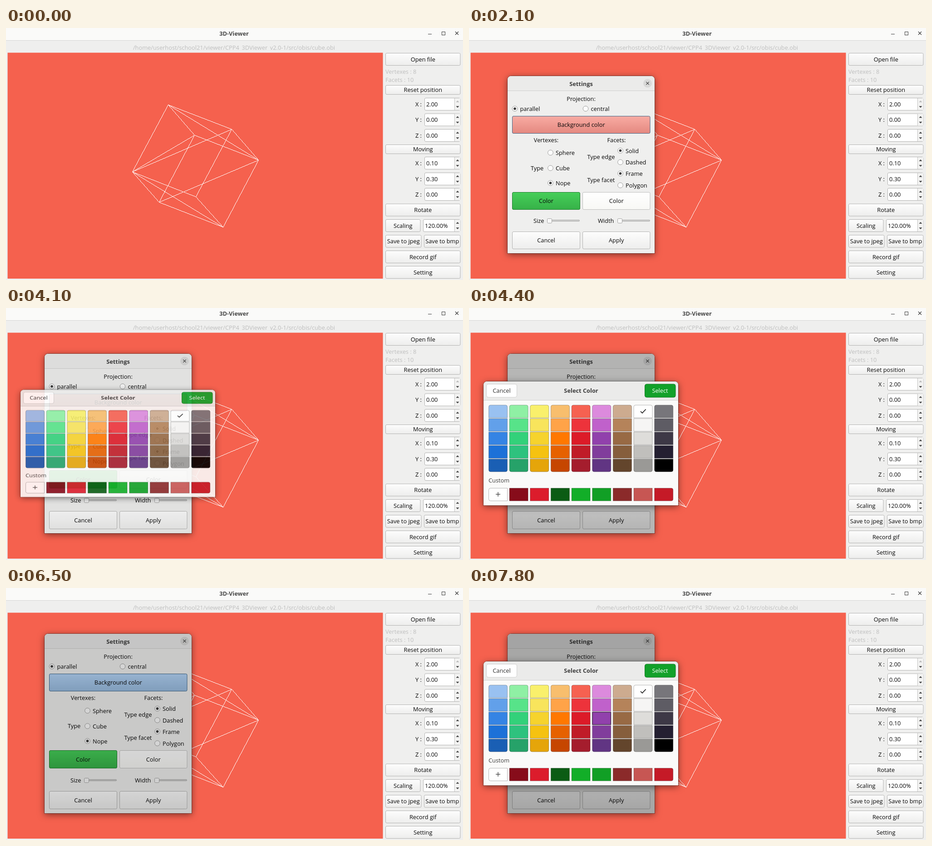
Write an HTML page with a canvas that moves like this. It is 1007 px wide and 556 px high and loops after 8 s.

```html
<!DOCTYPE html>
<html lang="en">
<head>
<meta charset="utf-8">
<title>3D-Viewer</title>
<style>
html, body { margin: 0; width: 100%; height: 100%; overflow: hidden; background: #efefee; }
canvas { display: block; }
</style>
</head>
<body>
<canvas id="stage" width="1007" height="556"></canvas>
<script>
const W = 1007, H = 556, LOOP = 8000, STEP = 100;
const INK = '#080808', WINDOW = '#efefee', HEADER = '#ebebea', RED = '#f5614e';
const stage = document.getElementById('stage').getContext('2d');
let ctx = stage;

// ---- helpers -------------------------------------------------------------
function text(s, x, y, { align = 'left', color = INK, bold = false } = {}) {
  ctx.font = `${bold ? 700 : 500} 12.8px "Open Sans", "Noto Sans", sans-serif`;
  ctx.textAlign = align;
  ctx.fillStyle = color;
  ctx.fillText(s, x, Math.round(y + 4.5));
}
const centred = (s, x, y, options) => text(s, x, y, { align: 'center', ...options });

function box(x, y, w, h, fill, stroke, radius = 2.5) {
  ctx.beginPath();
  ctx.roundRect(x + .5, y + .5, w - 1, h - 1, radius);
  ctx.fillStyle = fill;
  ctx.fill();
  if (!stroke) return;
  ctx.strokeStyle = stroke;
  ctx.lineWidth = 1;
  ctx.stroke();
}

function shade(y, h, top, bottom) {
  const g = ctx.createLinearGradient(0, y, 0, y + h);
  g.addColorStop(0, top);
  g.addColorStop(1, bottom);
  return g;
}

function button(label, x, y, w, h, { top = '#fdfdfd', bottom = '#ededec', border = '#b3b3b2' } = {}) {
  box(x, y, w, h, shade(y, h, top, bottom), border);
  centred(label, x + w / 2, y + h / 2);
}

function stroke(color, width, ...points) {
  ctx.beginPath();
  points.forEach(([x, y], i) => i ? ctx.lineTo(x, y) : ctx.moveTo(x, y));
  ctx.strokeStyle = color;
  ctx.lineWidth = width;
  ctx.stroke();
}

function cross(x, y, r, color = '#3d3d3d') {
  stroke(color, 1.2, [x - r, y - r], [x + r, y + r]);
  stroke(color, 1.2, [x - r, y + r], [x + r, y - r]);
}

function disc(x, y, r, fill, border) {
  ctx.beginPath();
  ctx.arc(x, y, r, 0, 2 * Math.PI);
  ctx.fillStyle = fill;
  ctx.fill();
  if (border) { ctx.strokeStyle = border; ctx.lineWidth = 1; ctx.stroke(); }
}

// One-pixel line without smoothing.
function hardLine([x0, y0], [x1, y1]) {
  const n = Math.max(Math.abs(x1 - x0), Math.abs(y1 - y0));
  for (let i = 0; i <= n; i++)
    ctx.fillRect(Math.round(x0 + (x1 - x0) * i / n), Math.round(y0 + (y1 - y0) * i / n), 1, 1);
}

function makeLayer() {
  const canvas = document.createElement('canvas');
  canvas.width = W;
  canvas.height = H;
  return canvas.getContext('2d');
}

function paintOn(layer, draw) {
  layer.clearRect(0, 0, W, H);
  ctx = layer;
  draw();
  ctx = stage;
}

function windowFrame(x, y, w, h, fill) {
  ctx.save();
  ctx.shadowColor = 'rgba(0,0,0,.5)';
  ctx.shadowBlur = 15;
  ctx.shadowOffsetY = 3;
  ctx.beginPath();
  ctx.roundRect(x, y, w, h, [8, 8, 0, 0]);
  ctx.fillStyle = fill;
  ctx.fill();
  ctx.restore();
  ctx.beginPath();
  ctx.roundRect(x - .5, y - .5, w + 1, h + 1, [8.5, 8.5, 0, 0]);
  ctx.strokeStyle = 'rgba(0,0,0,.35)';
  ctx.lineWidth = 1;
  ctx.stroke();
}

function headerBar(x, y, w, h) {
  ctx.beginPath();
  ctx.roundRect(x, y, w, h, [8, 8, 0, 0]);
  ctx.fillStyle = HEADER;
  ctx.fill();
  ctx.fillStyle = '#cfcfce';
  ctx.fillRect(x, y + h, w, 1);
}

// ---- main window ---------------------------------------------------------
const CUBE = {
  A: [357, 169], B: [497, 223], C: [415, 236], D: [556, 291],
  E: [278, 317], F: [337, 384], G: [418, 372], H: [478, 439]
};
const EDGES = 'AB AC AE BD CD BG CF DH EF EG FH GH AD CE BE DF EH'.split(' ');

function arrow(x, y, dir, color) {
  ctx.beginPath();
  ctx.moveTo(x - 3.5, y + 1.7 * dir);
  ctx.lineTo(x + 3.5, y + 1.7 * dir);
  ctx.lineTo(x, y - 2 * dir);
  ctx.fillStyle = color;
  ctx.fill();
}

function spin(value, x, y, atMax) {
  box(x, y, 1001.5 - x, 28, '#fff', '#b3b3b2');
  ctx.fillStyle = '#f3f3f2';
  ctx.fillRect(989, y + 1, 12, 26);
  ctx.fillStyle = '#c2c2c1';
  ctx.fillRect(988, y + 1, 1, 26);
  arrow(995, y + 8, 1, atMax ? '#b9b9b9' : '#444');
  arrow(995, y + 20, -1, '#444');
  text(value, x + 4, y + 14);
}

function axisSpin(axis, value, y, atMax) {
  text(axis + ' :', 916, y + 14, { align: 'right' });
  spin(value, 922, y, atMax);
}

function mainWindow(focus, pressed) {
  ctx.fillStyle = WINDOW;
  ctx.fillRect(0, 0, W, H);
  ctx.fillStyle = '#fafaf9';
  ctx.fillRect(0, 0, W, 27);
  if (focus) {
    ctx.globalAlpha = focus;
    ctx.fillStyle = HEADER;
    ctx.fillRect(0, 1, W, 26);
    ctx.globalAlpha = 1;
  }
  ctx.fillStyle = '#d6d6d4';
  ctx.fillRect(0, 27, W, 1);
  centred('3D-Viewer', 502.5, 12.5, { bold: true, color: '#474747' });
  ctx.fillStyle = '#3d3d3d';
  ctx.fillRect(930, 13, 8, 1);
  ctx.strokeStyle = '#3d3d3d';
  ctx.lineWidth = 1;
  ctx.strokeRect(960.5, 8.5, 7, 7);
  cross(993.5, 11.5, 3.5);

  ctx.save();
  ctx.beginPath();
  ctx.rect(0, 30, W, 18);
  ctx.clip();
  centred('/home/userhost/school21/viewer/CPP4_3DViewer_v2.0-1/src/objs/cube.obj',
    502.5, 43.5, { color: '#bebebe' });
  ctx.restore();

  ctx.fillStyle = RED;
  ctx.fillRect(3.5, 54.5, 827, 498.5);
  ctx.fillStyle = '#fff';
  for (const [a, b] of EDGES) hardLine(CUBE[a], CUBE[b]);

  button('Open file', 836, 55, 165.5, 28);
  text('Vertexes : 8', 836, 96, { color: '#bebebe' });
  text('Facets : 10', 836, 114, { color: '#bebebe' });
  button('Reset position', 836, 126, 165.5, 21);
  axisSpin('X', '2.00', 154, true);
  axisSpin('Y', '0.00', 188.5);
  axisSpin('Z', '0.00', 223);
  button('Moving', 836, 257, 165.5, 21);
  axisSpin('X', '0.10', 284);
  axisSpin('Y', '0.30', 319);
  axisSpin('Z', '0.00', 353);
  button('Rotate', 836, 387.5, 165.5, 28);
  button('Scaling', 836, 422, 77.5, 28);
  spin('120.00%', 919, 422);
  button('Save to jpeg', 836, 456.5, 79.5, 28);
  button('Save to bmp', 921, 456.5, 80.5, 28);
  button('Record gif', 836, 491, 165.5, 28);
  button('Setting', 836, 525, 165.5, 28, pressed ? { top: '#d8d8d7', bottom: '#d8d8d7' } : {});
}

// ---- settings dialog -----------------------------------------------------
const PINK = { top: '#f9aca4', bottom: '#e4887f', border: '#3f6688' };
const BLUE = { top: '#b4d5f8', bottom: '#98bbdf', border: '#3f6688' };
const PRESSED = { top: '#e59a92', bottom: '#d97f77', border: '#3f6688' };

function radio(label, x, y, on) {
  disc(x, y, 5.8, '#fdfdfd', '#9c9c9b');
  if (on) disc(x, y, 2.8, '#3c3c3c');
  text(label, x + 11.5, y + .5);
}

function slider(label, x, y, knob, end) {
  text(label, x, y);
  box(knob + 8, y - 2, end - knob - 8, 4, '#cfcfce', '#adadac', 1.5);
  box(knob, y - 5, 11, 11, '#f8f8f8', '#a5a5a4', 2);
}

function settingsDialog(stretch, face, dim) {
  // Rows move up with the top edge, less the nearer they are to the bottom.
  const at = y => y - stretch * (y > 440 ? .1 : y > 410 ? .3 : y > 236 ? .88 : 1);
  const top = at(106), height = 497 - top;
  windowFrame(85, top, 324, height, WINDOW);
  headerBar(85, top, 324, 32);
  centred('Settings', 247, at(123), { bold: true, color: '#3d3d3d' });
  disc(393.5, at(122), 9.5, '#d9d9d8');
  cross(393.5, at(122), 3.2);
  centred('Projection:', 247, at(156));
  radio('parallel', 101, at(178), true);
  radio('central', 257, at(178));
  button('Background color', 95, at(194), 304.5, 39, face);

  centred('Vertexes:', 170, at(247));
  radio('Sphere', 179.5, at(275));
  radio('Cube', 179.5, at(309));
  radio('Nope', 179.5, at(342), true);
  text('Type', 136, at(309));
  centred('Facets:', 325, at(247));
  text('Type edge', 260.5, at(284));
  text('Type facet', 260.5, at(335));
  radio('Solid', 333.5, at(270.5), true);
  radio('Dashed', 333.5, at(296));
  radio('Frame', 333.5, at(321), true);
  radio('Polygon', 333.5, at(347));

  const colorTop = Math.round(at(362)), colorHeight = 39 + stretch * .2;
  button('Color', 95, colorTop, 150, colorHeight, { top: '#46cf59', bottom: '#36b148', border: '#1f7a2d' });
  button('Color', 250, colorTop, 149.5, colorHeight, { top: '#ffffff', bottom: '#f8f8f5', border: '#bdbdbc' });
  slider('Size', 142, Math.round(at(425)), 172, 244);
  slider('Width', 284, Math.round(at(425)), 327, 399);
  button('Cancel', 95, 449 - stretch * .2, 150, 39 + stretch * .2);
  button('Apply', 250, 449 - stretch * .2, 149.5, 39 + stretch * .2);

  ctx.beginPath();
  ctx.roundRect(85, top, 324, height, [8, 8, 0, 0]);
  ctx.fillStyle = `rgba(0,0,0,${.3 * dim})`;
  ctx.fill();
}

// ---- colour chooser ------------------------------------------------------
const PALETTE = [
  '99c1f1 62a0ea 3584e4 1c71d8 1a5fb4', '8ff0a4 57e389 33d17a 2ec27e 26a269',
  'f9f06b f8e45c f6d32d f5c211 e5a50a', 'f8be6d ffa348 ff7800 e66100 c64600',
  'f66151 ed333b dc1b28 c01c28 a51d2d', 'dc8add c061cb 9141ac 813d9c 613583',
  'cdab8f b5835a 986a44 865e3c 63452c', 'ffffff f6f5f4 deddda c0bfbc 9a9996',
  '77767b 5e5c64 3d3846 241f31 000000'
].map(column => column.split(' '));
const CUSTOM = 'ffffff 870c1a dc1c2c 0b5c14 12ae28 119f25 8b2a2a c75653 c51a27'.split(' ');
const cellX = column => 43 + column * 45.65;

function cell(column, y, color, corners, hovered) {
  const x = cellX(column);
  box(x, y, 42, 29, '#' + color, hovered ? 'rgba(0,0,0,.75)' : 'rgba(0,0,0,.28)', corners);
  if (hovered) box(x + 1, y + 1, 40, 27, 'transparent', 'rgba(0,0,0,.2)', corners);
}

function chooser(selected, hover) {
  windowFrame(32, 162, 429, 273.5, '#fafaf9');
  headerBar(32, 162, 429, 41);
  box(38, 167.5, 68, 30, '#fff', '#cfcfce', 4);
  centred('Cancel', 72, 182, { color: '#333' });
  box(387, 167.5, 68.5, 30, '#12a12a', '#0c7a1e', 4);
  centred('Select', 421, 182, { color: '#fff' });
  centred('Select Color', 247, 182, { bold: true, color: '#3d3d3d' });

  PALETTE.forEach((column, c) => column.forEach((color, r) => {
    const corners = r === 0 ? [4, 4, 0, 0] : r === 4 ? [0, 0, 4, 4] : 0;
    cell(c, 213.7 + r * 29.75, color, corners, hover && hover[0] === c && hover[1] === r);
  }));
  const x = cellX(selected) + 21;
  stroke('#1a1a1a', 1.7, [x - 5.5, 228], [x - 1.8, 231.8], [x + 6, 223.5]);

  text('Custom', 43, 380, { color: '#3d3d3d' });
  CUSTOM.forEach((color, c) =>
    cell(c, 397, color, c === 0 ? [4, 0, 0, 4] : c === 8 ? [0, 4, 4, 0] : 0));
  stroke('#333', 1.2, [59, 411], [69, 411]);
  stroke('#333', 1.2, [64, 406], [64, 416]);
}

// ---- timeline: [time, value], each value holds until the next -------------
const TRACKS = {
  focus: [[0, 0], [900, 1], [1000, .5], [1100, 0]],
  dialog: [[0, 0], [1000, .6], [1100, 1]],
  travel: [[0, 0], [2000, .5], [2100, 1]],
  stretch: [[0, 0], [2700, 2], [2800, 4], [2900, 5]],
  face: [[0, PINK], [3800, PRESSED], [4100, PINK], [6100, BLUE]],
  dim: [[0, 0], [4100, .2], [4200, .4], [4300, .6], [4400, .8], [4500, 1],
    [6400, .8], [6500, .54], [6600, .3], [6700, .1], [6800, 0],
    [7200, .18], [7300, .38], [7400, .58], [7500, .78], [7600, 1]],
  open: [[0, 0], [4100, .865], [4200, 1], [6200, .8], [6300, .3], [6400, 0], [7200, .865], [7300, 1]],
  selected: [[0, 7], [5500, 0], [6800, 7]],
  hover: [[0, null], [4900, [2, 1]], [5200, [1, 0]], [5400, [0, 0]], [5800, null], [7800, [5, 2]]]
};
const valueAt = (track, t) => TRACKS[track].findLast(([time]) => time <= t)[1];

const settingsLayer = makeLayer(), chooserLayer = makeLayer();

function draw(t) {
  const v = name => valueAt(name, t);
  mainWindow(v('focus'), t >= 900 && t < 1100);

  const shown = v('dialog');
  if (shown) {
    paintOn(settingsLayer, () => settingsDialog(v('stretch'), v('face'), v('dim')));
    const away = 1 - v('travel'), scale = .88 + .12 * shown;
    ctx.save();
    ctx.globalAlpha = shown;
    ctx.translate(Math.round(-85 * away), Math.round(-105 * away));
    if (scale < 1) {
      ctx.translate(247, 302);
      ctx.scale(scale, scale);
      ctx.translate(-247, -302);
    }
    ctx.drawImage(settingsLayer.canvas, 0, 0);
    ctx.restore();
  }

  const open = v('open');
  if (open) {
    paintOn(chooserLayer, () => chooser(v('selected'), v('hover')));
    ctx.save();
    ctx.globalAlpha = open < 1 ? Math.min(.9, open + .03) : 1;
    ctx.translate(0, 299 * (1 - open));
    ctx.scale(1, open);
    ctx.drawImage(chooserLayer.canvas, 0, 0);
    ctx.restore();
  }
}

let last = -1;
const start = performance.now();
function tick() {
  const elapsed = (performance.now() - start) % LOOP;
  const t = Math.floor(elapsed / STEP) * STEP;
  if (t !== last) draw(last = t);
  requestAnimationFrame(tick);
}
tick();
</script>
</body>
</html>
```
